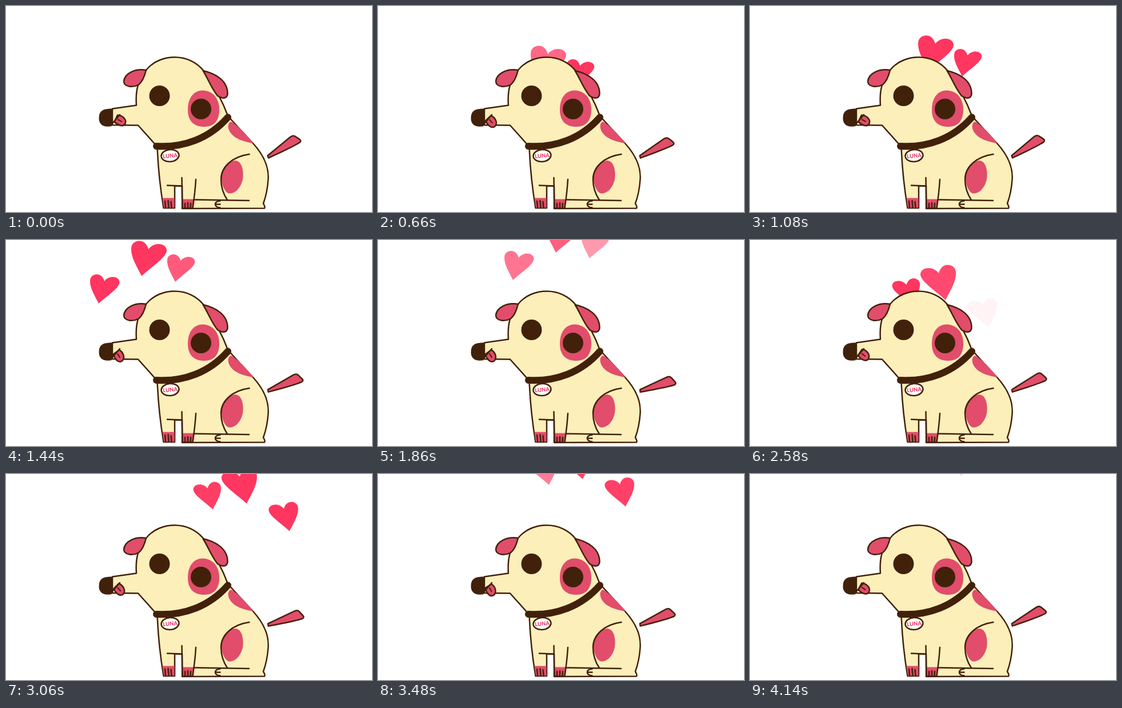
An HTML page for the animation above (4.2 s loop, 640 px wide and 360 px high).

```html
<!DOCTYPE html>
<html lang="en">
<head>
<meta charset="utf-8">
<title>Dog with hearts</title>
<style>
  html, body { margin: 0; width: 100%; height: 100%; overflow: hidden; background: #fff; }
  svg { display: block; width: 100%; height: 100%; }
  .line { fill: none; stroke: #42210b; stroke-width: 2.5; stroke-linecap: round; stroke-linejoin: round; }
  .cream { fill: #fcefba; }
  .red { fill: #e14d6b; }
  .brown { fill: #42210b; }
  text { font: 800 9.5px Lato, "Open Sans", sans-serif; fill: #e8385f; text-anchor: middle; }
</style>
</head>
<body>
<svg viewBox="0 0 640 360">
  <g id="hearts" fill="#ff365f"></g>
  <path id="tail" class="line red" d="M457.5 261.5L497 229Q502 225 506 228L513.5 233Q517 235.5 513.5 238.5C505 244 480 256 459 265.5Z"/>

  <path class="line cream" d="M186 179.5L228 173.5C226 145 232 128 245 112C258 96 277 89.500 295 89.500C315 89.500 333 98 345 112.500C366 142 378 165 388 192C402 208 418 225 432 240C452 262 460 282 458.500 303C457 325 453 337 450 345C451 348 454 350 452 353.500L308 354V314.500H295V353H275.500C270 320 266 285 264.500 246L231 208.500L186 208Z"/>
  <path class="red" d="M393 202C404 207 420 224 432.500 240C415 237 397 232 390 217C387.500 210 388 205 393 202Z"/>
  <path class="red" d="M377 301C378 286 388 270 401 270C413 271 416 289 414 303C410 320 398 330 388 327C381 322 377 312 377 301Z"/>
  <path class="red" d="M273.500 335.500H294.500V352.500H276ZM308.500 337.500H328.500L326.500 353.500H308.500Z"/>
  <g class="line">
    <path d="M282 313.500L308 314.500M307.500 300L308.500 353.500H326.500C329 336 331 320 332 303"/>
    <path d="M330 338.500L425 340M425.500 259C396 263 376 281 376 303C376 320 383 333 387 339"/>
    <path d="M374.500 340.500C363 341 363 352 374.500 352.500M367 346.500H374.500"/>
    <path d="M278 341L279 352M283.500 340L284.500 352M288.500 342L289.500 352M313 345V353M318 344V353M323 345L322.500 353"/>
  </g>

  <path class="line red" d="M245 112C225 109 207 118 206 132C207 142 222 143 232 137.500C239 132 243 120 245 112Z"/>
  <path class="line red" d="M344.500 113C366 118 388 130 387.500 154C386 163 378 162 370 157C358 142 355 130 344.500 113Z"/>
  <path class="red" d="M344 147.500C362 148 373 162 373 181C373 200 364 211 347 211C328 211 318 201 318 181C318 161 328 147.500 344 147.500Z"/>
  <circle class="brown" cx="268.500" cy="157" r="18"/>
  <circle class="brown" cx="341" cy="180" r="18"/>
  <path class="line brown" style="stroke-width:1.5" d="M186 180C175 180.500 165 181 163.500 192C162 204 167 212 184 209.500Z"/>
  <g id="tongue" class="line">
    <path class="red" d="M-2 -6.500C5 -10 16 -7 16.500 1C16.500 9 6 9 -2 6.500Z"/>
    <path style="stroke-width:2" d="M2 0L9 .5"/>
  </g>
  <path class="line" d="M184.500 207L199 190"/>

  <path class="line" style="stroke-width:12" d="M263 245C310 248 355 232 388 194.500"/>
  <g transform="translate(287 261.500) rotate(-5)">
    <ellipse class="line" style="fill:#fff" rx="15.500" ry="10.500"/>
    <text y="3.500">LUNA</text>
  </g>
</svg>
<script>
const LOOP = 4200, STEP = 60, MIRROR = 669;
const HEART = "M0 0C-7 -15 -21 -35 -17.5 -52C-14 -64 7 -67 12 -47C22 -60 42 -58 44 -46C45 -33 18 -17 0 0Z";

// Each flight: time, sideways drift, rise
const flights = [
  [[420, 20, 100], [540, 35, 73], [660, 48, 68], [1080, 75, 50], [1440, 0, 0], [1860, 74, -41], [2500, 10, -112]],
  [[2000, 20, 105], [2220, 50, 68], [2580, 90, 42], [2950, 4, 0], [3480, 74, -54], [3800, 60, -80], [4140, 137, -108], [4200, 140, -113]]
];

// Tip x, tip y, size, then fade [in start, in end, out start, out end] per flight
const shapes = [
  { x: 237, y: 63, size: 1, fades: [[480, 720, 1700, 2500], [2310, 2610, 3430, 4430]] },
  { x: 162, y: 111, size: .83, fades: [[1100, 1400, 1560, 2500], [2560, 2900, 3430, 4430]] },
  { x: 296, y: 73, size: .78, fades: [[400, 600, 1200, 2520], [2200, 2500, 3000, 4370]] }
];

// Time and running phase in whole turns
const wag = [[0, .068], [660, 1.196], [1440, 2.705], [1860, 3.428], [2580, 4.75], [3480, 6.315], [4140, 7.78], [4200, 8.068]];
const lick = [[0, 0], [660, 1.3], [1440, 2.6], [1860, 3.4], [2580, 4.82], [3480, 6.5], [4140, 7.91], [4200, 8]];

const clamp = v => Math.min(1, Math.max(0, v));
const ease = p => (1 - Math.cos(Math.PI * p)) / 2;
const linear = p => p;

function at(keys, t, col, curve = linear) {
  let i = 0;
  while (i < keys.length - 2 && t >= keys[i + 1][0]) i++;
  const a = keys[i], b = keys[i + 1];
  return a[col] + (b[col] - a[col]) * curve(clamp((t - a[0]) / (b[0] - a[0])));
}

const swing = (keys, t) => Math.cos(2 * Math.PI * at(keys, t, 1));
const fade = ([a, b, c, d], t) => Math.min(clamp((t - a) / (b - a)), clamp((d - t) / (d - c)));

const tail = document.getElementById("tail");
const tongue = document.getElementById("tongue");
const layer = document.getElementById("hearts");
const hearts = [];
flights.forEach((path, n) => shapes.forEach(shape => {
  const el = document.createElementNS("http://www.w3.org/2000/svg", "path");
  el.setAttribute("d", HEART);
  layer.append(el);
  hearts.push({ el, path, shape, flip: n === 1, fading: shape.fades[n] });
}));

function draw(t) {
  for (const { el, path, shape, flip, fading } of hearts) {
    const x = shape.x + at(path, t, 1, ease);
    const y = shape.y + at(path, t, 2);
    const s = shape.size;
    el.setAttribute("transform", `translate(${flip ? MIRROR - x : x} ${y}) scale(${flip ? -s : s} ${s})`);
    el.setAttribute("opacity", fade(fading, t));
  }
  tail.setAttribute("transform", `rotate(${7.3 - 8 * swing(wag, t)} 458 264)`);
  tongue.setAttribute("transform", `translate(194 197.5) rotate(${41 - 16 * swing(lick, t)})`);
}

const start = performance.now();
function tick() {
  const t = (performance.now() - start) % LOOP;
  draw(Math.floor(t / STEP) * STEP);
  requestAnimationFrame(tick);
}
tick();
</script>
</body>
</html>
```
